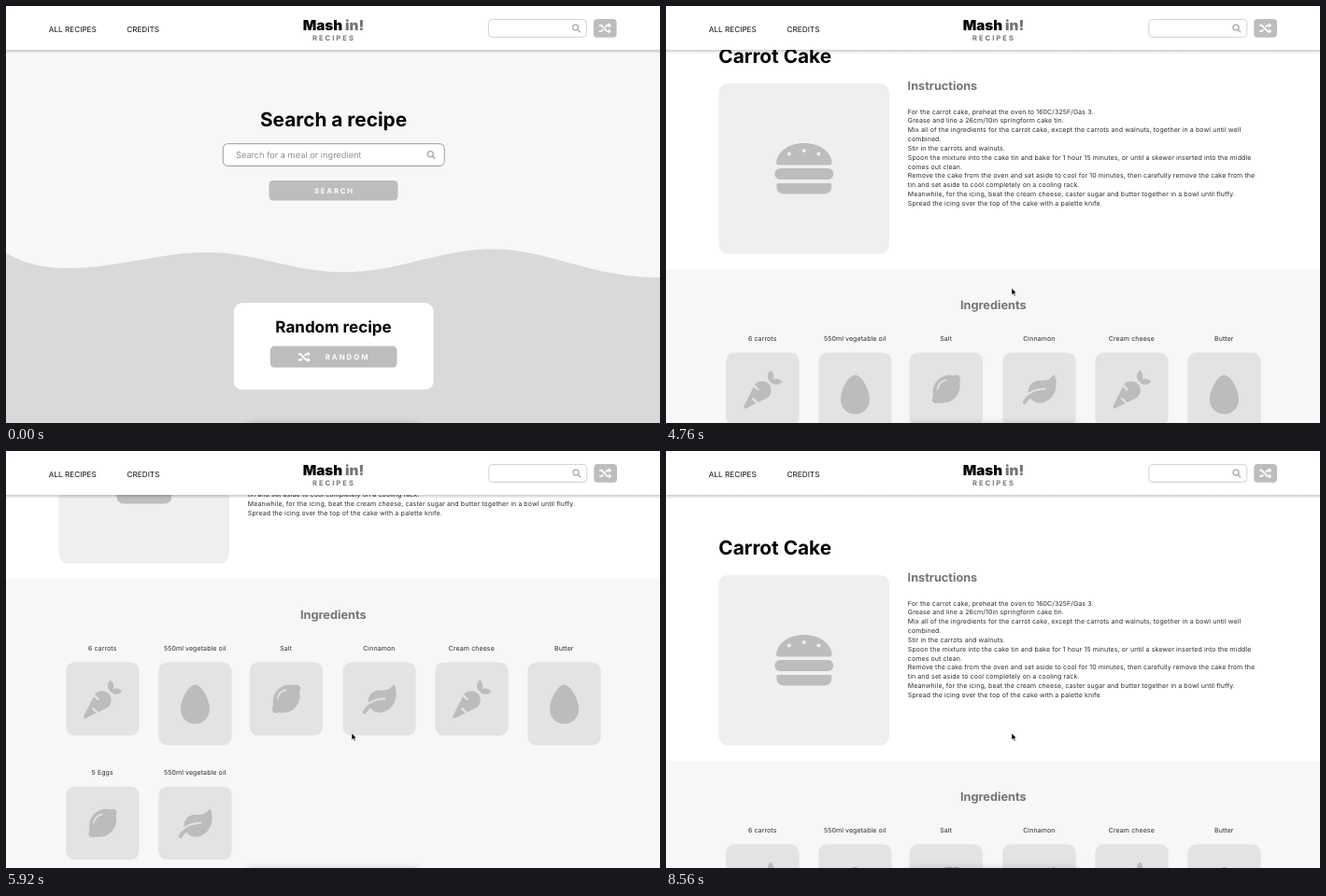
Recreate the animation shown at these times as an HTML page. Size 700 by 447 pixels, loop 8600 ms.

```html
<!DOCTYPE html>
<html lang="en">
<head>
<meta charset="utf-8">
<title>Recipe site</title>
<style>
  html, body { margin: 0; width: 100%; height: 100%; overflow: hidden; background: #fff; }
  svg { display: block; width: 100%; height: 100%; }
  text { font-family: Inter, "Open Sans", sans-serif; font-optical-sizing: none; white-space: pre; text-rendering: geometricPrecision; }
</style>
</head>
<body>
<svg id="stage" viewBox="0 0 700 447" xmlns="http://www.w3.org/2000/svg"></svg>
<script>
const LOOP = 8600, STEP = 40, PAGE_CHANGE = 3560;
const GREY = '#757575', BODY = '#2b2b2b', BUTTON = '#bdbdbd', CARD = '#e3e3e3', ICON = '#bcbcbc';

// --- drawing helpers ---
const text = (x, y, size, weight, str, { fill = '#000', anchor = 'start', gap = 0 } = {}) =>
  `<text x="${x}" y="${y}" font-size="${size}" font-weight="${weight}" fill="${fill}" text-anchor="${anchor}" letter-spacing="${gap}">${str}</text>`;
const mid = (x, y, size, weight, str, opts) => text(x, y, size, weight, str, { anchor: 'middle', ...opts });
const box = (x, y, w, h, r, fill, stroke = 'none') =>
  `<rect x="${x}" y="${y}" width="${w}" height="${h}" rx="${r}" fill="${fill}" stroke="${stroke}"/>`;
const at = (x, y, body) => `<g transform="translate(${x} ${y})">${body}</g>`;
const shape = (d, fill = ICON) => `<path d="${d}" fill="${fill}"/>`;
const line = (d, stroke, width) =>
  `<path d="${d}" fill="none" stroke="${stroke}" stroke-width="${width}" stroke-linecap="round"/>`;

const brand = (lead = '') =>
  `<tspan fill="${GREY}" font-weight="700">${lead}</tspan><tspan font-weight="900">Mash</tspan>` +
  `<tspan fill="${GREY}" font-weight="900"> in!</tspan>`;

const lens = (x, y) => at(x, y,
  `<circle cx="-.8" cy="-.8" r="3" fill="none" stroke="#b3b3b3" stroke-width="1.5"/>` +
  line('M1.6 1.6L3.8 3.8', '#b3b3b3', 1.7));

const shuffle = (x, y) => at(x, y,
  `<path d="M-6.5 -3.2H-4L2 3.2H4M-6.5 3.2H-4L-2.4 1.5M.3 -1.4L2 -3.2H4" fill="none" stroke="#fff" stroke-width="1.9"/>` +
  shape('M3.5 -5.8L6.6 -3.2L3.5 -.5ZM3.5 .5L6.6 3.2L3.5 5.8Z', '#fff'));

// --- food icons, each placed inside its card ---
const foods = {
  carrot: at(19, 19, `<g transform="scale(1.025)">` +
    shape('M.2 37.5L11.6 14.8C14.4 11.4 19 11 23.3 12.2C28 14.4 30 20 27.8 25.2C26.7 27.2 25 28.7 23.3 29.6L2.5 39.8Q-.6 40.6 .2 37.5Z') +
    shape('M28 12.2C24 8 24 3.5 28.1 0C31.3 2.6 32 6.4 30.5 9.5C33.6 8 37.4 8.7 40 11.9C36.7 15.8 31.6 16 28 12.2Z') +
    line('M9.8 15L15 20.2M9.8 29.8L14.6 34.6', CARD, 2.3) + '</g>'),
  egg: at(23.7, 24, shape('M15.5 0C9 0 0 15 0 26.5A15.5 15.5 0 0 0 31 26.5C31 15 22 0 15.5 0Z')),
  lemon: at(23.8, 23.7,
    shape('M29.5 1.5C28 0 25.5 0 23.5 1C15 -2 -1 5 1.5 22.5C0 25.5 0 28 1.5 29.5C3 31 5.5 31 7.5 30C25 32.5 32.5 17 29.5 8C31 5.5 31 3 29.5 1.5Z') +
    line('M6 15C7 10.4 10.4 7 15 6', CARD, 1.7)),
  leaf: at(21.4, 24, shape('M34.2 .6C33.8 -.2 32.8 -.2 32.4 .5C30.4 3.9 27 6 23 6H18C11 6 6 11.5 6 18L6.1 19.3C10 16.4 16 14 24 14A1 1 0 0 1 24 16C8.3 16 1.6 25.6 .1 29.2C-.3 31 2 32.4 3.8 30.8C4 30.4 5.2 27.8 8.4 25.1C10.4 27.8 14.2 30.4 19.3 29.9C29 29.2 36 20.4 36 9.6C36 6.5 35.4 3.3 34.2 .6Z')),
};

const burger = at(147.8, 224,
  shape('M-27 -3.5Q-30.5 -3.5 -29.6 -8C-27 -20 -14 -27 0 -27S27 -20 29.6 -8Q30.5 -3.5 27 -3.5Z', BUTTON) +
  box(-31.5, .1, 63, 12, 6, BUTTON) +
  shape('M-28 16H28Q29.5 16 29.5 17.6V19Q29.5 27.6 21 27.6H-21Q-29.5 27.6 -29.5 19V17.6Q-29.5 16 -28 16Z', BUTTON) +
  [[-16, -15.5], [0, -19], [15.5, -15.5]].map(([x, y]) => `<circle cx="${x}" cy="${y}" r="2" fill="#efefef"/>`).join(''));

// --- pages ---
const home =
  box(0, 0, 700, 447, 0, '#f7f7f7') +
  shape('M0 264.5C20 277 42 281 66 281C120 281 165 264 215 264C268 264 305 285.3 362 285.3C420 285.3 465 260.5 520 260.5C580 260.5 625 291 700 291V447H0Z', '#d9d9d9') +
  mid(350.5, 129, 20.8, 700, 'Search a recipe') +
  box(232.3, 147.7, 236.9, 23.8, 5, '#fff', '#9a9a9a') +
  text(246, 163.3, 9.4, 300, 'Search for a meal or ingredient', { fill: GREY }) +
  lens(455, 159.5) +
  box(281.5, 187, 138, 21.5, 4.5, BUTTON) +
  text(330, 200.6, 7.8, 700, 'SEARCH', { fill: '#fff', gap: 1.75 }) +
  box(243.8, 318.3, 213.7, 93, 9, '#fff') +
  mid(350.5, 349.6, 17, 700, 'Random recipe') +
  box(282.8, 364.6, 135.7, 23, 4.5, BUTTON) +
  shuffle(319.3, 376.3) +
  text(341.7, 379.3, 7.8, 700, 'RANDOM', { fill: '#fff', gap: 2 });

const steps = [
  'For the carrot cake, preheat the oven to 160C/325F/Gas 3.',
  'Grease and line a 26cm/10in springform cake tin.',
  'Mix all of the ingredients for the carrot cake, except the carrots and walnuts, together in a bowl until well',
  'combined.',
  'Stir in the carrots and walnuts.',
  'Spoon the mixture into the cake tin and bake for 1 hour 15 minutes, or until a skewer inserted into the middle',
  'comes out clean.',
  'Remove the cake from the oven and set aside to cool for 10 minutes, then carefully remove the cake from the',
  'tin and set aside to cool completely on a cooling rack.',
  'Meanwhile, for the icing, beat the cream cheese, caster sugar and butter together in a bowl until fluffy.',
  'Spread the icing over the top of the cake with a palette knife.',
];

const ingredients = [
  ['6 carrots', 'carrot'], ['550ml vegetable oil', 'egg'], ['Salt', 'lemon'],
  ['Cinnamon', 'leaf'], ['Cream cheese', 'carrot'], ['Butter', 'egg'],
  ['5 Eggs', 'lemon'], ['550ml vegetable oil', 'leaf'],
];
const columns = [64.2, 163.2, 260.7, 360.3, 459.3, 558.3];

const ingredient = ([name, food], i) => {
  const x = columns[i % 6], y = i < 6 ? 421.5 : 554.7;
  return mid(x + 39, y - 12.4, 7, 400, name, { gap: .1, fill: BODY }) +
    at(x, y, box(0, 0, 78.4, food === 'egg' ? 89 : 78.4, 9, CARD) + foods[food]);
};

const recipe =
  box(0, 0, 700, 332, 0, '#fff') +
  box(0, 332, 700, 336.5, 0, '#f7f7f7') +
  box(0, 668.5, 700, 200, 0, '#d9d9d9') +
  text(56.3, 111.2, 20.8, 700, 'Carrot Cake') +
  box(56.4, 133, 182.6, 182.6, 10, '#efefef') + burger +
  text(258.6, 139.8, 12.7, 700, 'Instructions', { fill: GREY }) +
  steps.map((s, i) => text(258.8, 165.6 + i * 9.82, 7, 400, s, { gap: .11, fill: BODY })).join('') +
  mid(350.3, 375, 12.75, 700, 'Ingredients', { fill: GREY }) +
  ingredients.map(ingredient).join('') +
  mid(350.3, 704.6, 15.4, 700, brand('Lets '));

const header =
  '<rect y="47" width="700" height="4" fill="url(#drop)"/>' +
  box(0, 0, 700, 47, 0, '#fff') +
  text(45.8, 27.7, 8.2, 400, 'ALL RECIPES', { fill: '#111' }) +
  mid(350.5, 25.8, 15.2, 900, brand()) +
  text(328, 36.8, 7.6, 700, 'RECIPES', { fill: GREY, gap: 2 }) +
  '<g id="tools">' +
  text(129.2, 27.7, 8.2, 400, 'CREDITS', { fill: '#111' }) +
  box(516.4, 14.4, 105, 19, 4, '#fff', '#d2d2d2') + lens(610.4, 23.9) +
  box(628.9, 14, 24.7, 19.8, 4, BUTTON) + shuffle(641.3, 23.9) +
  '</g>';

const arrow = '<path d="M0 0V7.3L1.7 5.7L2.9 8.5L4.1 8L2.9 5.3H5.2Z" fill="#000" stroke="#fff" stroke-width=".5"/>';
const hand = '<path d="M-.8 .8Q0 -.4 .8 .8V3.2L3 3.7Q4.2 4 4.1 5.2L3.4 8V9.4H-.8V8.2L-3 5.6Q-2.6 4.4 -.8 5.6Z" fill="#fff" stroke="#222" stroke-width=".7" stroke-linejoin="round"/>';

const stage = document.getElementById('stage');
stage.innerHTML = `<defs>
  <linearGradient id="drop" x2="0" y2="1"><stop stop-color="#000" stop-opacity=".2"/><stop offset="1" stop-color="#000" stop-opacity="0"/></linearGradient>
  <filter id="blur" x="-20%" y="-100%" width="140%" height="300%"><feGaussianBlur stdDeviation="4"/></filter>
</defs>
<g id="home">${home}</g><g id="recipe">${recipe}</g>${header}
<rect x="258" y="448" width="184" height="20" rx="5" fill="#000" opacity=".2" filter="url(#blur)"/>
<g id="cursor"><g id="arrow">${arrow}</g><g id="hand">${hand}</g></g>`;
const [homeEl, recipeEl, toolsEl, cursorEl, arrowEl, handEl] =
  ['home', 'recipe', 'tools', 'cursor', 'arrow', 'hand'].map(id => document.getElementById(id));

// --- motion ---
const cursorKeys = [
  [40, 432, 161], [440, 355.5, 126.3], [1000, 355.5, 126.3], [1400, 309, 250], [1840, 316, 375],
  [1960, 316, 375], [2200, 366.8, 373.5], [2360, 389, 379], [2560, 372, 359], [2840, 363, 373],
  [2920, 349, 373], [3160, 349, 373], [3240, 372, 358], [3280, 370, 377], [3320, 363, 372],
  [4120, 363, 372], [4320, 370, 302.5],
];
const scrollKeys = [
  [4600, 0], [4760, 50], [5040, 260.5], [5200, 300], [5760, 300], [5920, 195], [6160, 0],
];

// Monotone cubic through the keys, so pauses and turning points come to rest.
function sample(keys, t, col) {
  const last = keys.length - 1;
  if (t <= keys[0][0]) return keys[0][col];
  if (t >= keys[last][0]) return keys[last][col];
  const rate = i => i < 0 || i >= last ? 0 : (keys[i + 1][col] - keys[i][col]) / (keys[i + 1][0] - keys[i][0]);
  const slope = i => {
    const a = rate(i - 1), b = rate(i);
    return a * b <= 0 ? 0 : 2 * a * b / (a + b);
  };
  let i = 0;
  while (t >= keys[i + 1][0]) i++;
  const h = keys[i + 1][0] - keys[i][0], u = (t - keys[i][0]) / h, v = 1 - u;
  return v * v * (1 + 2 * u) * keys[i][col] + u * u * (3 - 2 * u) * keys[i + 1][col] +
    h * u * v * (v * slope(i) - u * slope(i + 1));
}

const show = (el, on) => el.setAttribute('display', on ? 'inline' : 'none');
const move = (el, x, y) => el.setAttribute('transform', `translate(${x.toFixed(2)} ${y.toFixed(2)})`);

function render(ms) {
  const t = Math.floor(ms % LOOP / STEP) * STEP;
  const onRecipe = t >= PAGE_CHANGE;
  show(homeEl, !onRecipe);
  show(recipeEl, onRecipe);
  move(recipeEl, 0, -sample(scrollKeys, t, 1));
  move(toolsEl, onRecipe ? .4 : 0, 0);

  const x = sample(cursorKeys, t, 1), y = sample(cursorKeys, t, 2);
  const overButton = !onRecipe && x > 283 && x < 418 && y > 364.5 && y < 387.5;
  show(cursorEl, t >= 80);
  show(handEl, overButton);
  show(arrowEl, !overButton);
  move(cursorEl, x, y);
}

const start = performance.now();
function tick() {
  render(performance.now() - start);
  requestAnimationFrame(tick);
}
tick();
</script>
</body>
</html>
```
